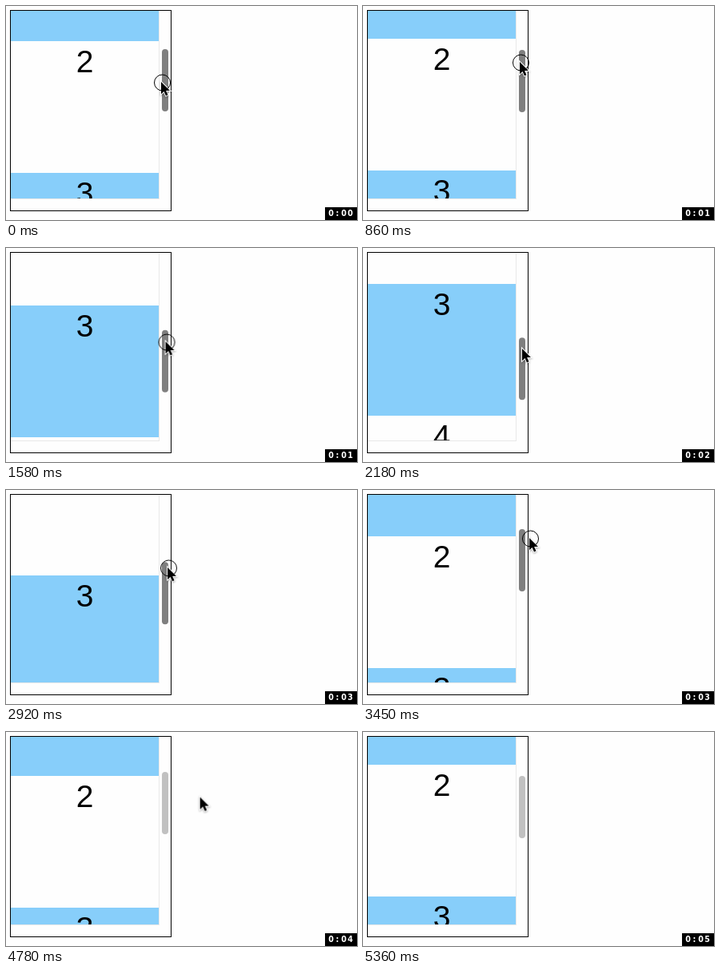
Recreate the animation shown at these times as an HTML page. Size 439 px wide and 268 px high, loop 5.75 s.

```html
<!DOCTYPE html>
<html lang="en">
<head>
<meta charset="utf-8">
<title>Scroll snapping</title>
<style>
  @property --scroll { syntax: '<integer>'; inherits: true; initial-value: 127; }

  html, body { margin: 0; width: 100%; height: 100%; overflow: hidden; background: #fefefe; }
  #stage { display: block; width: 439px; height: 268px; animation: scroll 5750ms linear infinite; }

  .content { transform: translateY(calc(var(--scroll) * -1px)); }
  .content text { font: 39px "Liberation Sans", Arial, sans-serif; text-anchor: middle; }
  .blue { fill: #87cefa; }
  .track { fill: #e8e8e8; }

  .thumb {
    transform: translateY(calc(var(--scroll) * .356px));
    animation: thumb 5750ms step-end infinite;
  }
  .pointer { animation: move 5750ms linear infinite, leave 5750ms step-end infinite; }
  .ring { fill: none; stroke: #000; animation: press 5750ms step-end infinite; }
  .arrow { stroke: #fff; stroke-width: 2; paint-order: stroke; filter: drop-shadow(0 1px 1px #0005); }

  .clock text { font: bold 9.6px "DejaVu Sans", sans-serif; fill: #fff; text-anchor: middle; }
  .seconds { animation: tick 5750ms step-end infinite; }

  @keyframes scroll {
    0%, .52% { --scroll: 127; }
    1.39% { --scroll: 130; }
    14.96% { --scroll: 130; animation-timing-function: ease-in; }
    21.57% { --scroll: 203; }
    24.52% { --scroll: 238; }
    25.04% { --scroll: 240; animation-timing-function: ease-out; }
    32.7% { --scroll: 291; }
    37.91% { --scroll: 291; animation-timing-function: ease-in-out; }
    41.39% { --scroll: 295; }
    48.17% { --scroll: 295; animation-timing-function: ease-in; }
    50.78% { --scroll: 229; animation-timing-function: ease-out; }
    58.09% { --scroll: 125; }
    60% { --scroll: 113; animation-timing-function: ease-out; }
    61.39%, 69.22% { --scroll: 105; }
    73.22% { --scroll: 94; }
    80% { --scroll: 94; animation-timing-function: ease-in-out; }
    85.5%, 100% { --scroll: 130; }
  }
  @keyframes move {
    0% { transform: translate(194px, 95px); }
    7.13% { transform: translate(194px, 95px); animation-timing-function: ease-in-out; }
    12.35% { transform: translate(196px, 70px); }
    14.96% { transform: translate(196px, 70px); animation-timing-function: ease-in; }
    21.57% { transform: translate(200px, 97px); }
    24.52% { transform: translate(200px, 108px); }
    25.04% { transform: translate(200px, 109px); animation-timing-function: ease-out; }
    32.7% { transform: translate(199px, 126px); }
    48.17% { transform: translate(199px, 126px); animation-timing-function: ease-in; }
    50.78% { transform: translate(202px, 97px); animation-timing-function: ease-out; }
    58.09% { transform: translate(207px, 64px); }
    60% { transform: translate(208px, 60px); animation-timing-function: ease-out; }
    61.39%, 69.22% { transform: translate(208px, 58px); }
    73.22% { transform: translate(209px, 54px); }
    80.4% { transform: translate(209px, 54px); animation-timing-function: ease-in-out; }
    89.74% { transform: translate(396px, 207px); }
    90.26% { transform: translate(397px, 208px); animation-timing-function: ease-out; }
    93.2%, 100% { transform: translate(403px, 254px); }
  }
  @keyframes press {
    0%, 14.96%, 48.17% { opacity: 1; }
    .52%, 37.91%, 80%, 100% { opacity: 0; }
  }
  @keyframes leave {
    0% { visibility: visible; }
    93.2%, 100% { visibility: hidden; }
  }
  @keyframes thumb {
    0% { fill: #7f7f7f; }
    80%, 100% { fill: #c1c1c1; }
  }
  @keyframes tick {
    0% { transform: translateY(0); }
    14.96% { transform: translateY(-16px); }
    31.83% { transform: translateY(-32px); }
    49.22% { transform: translateY(-48px); }
    66.61% { transform: translateY(-64px); }
    84%, 100% { transform: translateY(-80px); }
  }
</style>
</head>
<body>
<svg id="stage" viewBox="0 0 439 268">
  <rect x="5.5" y="5.5" width="201" height="251" fill="#fefefe" stroke="#000"/>

  <svg x="6" y="6" width="185" height="235">
    <g class="content">
      <rect class="blue" width="185" height="165"/>
      <rect class="blue" y="330" width="185" height="165"/>
      <text x="92.5" y="39">1</text>
      <text x="92.5" y="204">2</text>
      <text x="92.5" y="369">3</text>
      <text x="92.5" y="534">4</text>
    </g>
  </svg>

  <rect class="track" x="191" y="6" width="1" height="236"/>
  <rect class="track" x="6" y="241" width="185" height="1"/>
  <rect class="thumb" x="195" y="8.7" width="8" height="78" rx="4"/>

  <g class="pointer">
    <path class="arrow" d="M0 0V15.2L3.6 11.9L6 17.4L8.5 16.3L6.1 11H11Z"/>
    <circle class="ring" cx="1.5" cy="1" r="10"/>
  </g>

  <g class="clock">
    <rect x="399" y="252" width="40" height="16"/>
    <text x="406.5" y="263">0</text>
    <text x="414.5" y="263">:</text>
    <text x="422.5" y="263">0</text>
    <svg x="426" y="252" width="9" height="16">
      <g class="seconds">
        <text x="4.5" y="11">0</text>
        <text x="4.5" y="27">1</text>
        <text x="4.5" y="43">2</text>
        <text x="4.5" y="59">3</text>
        <text x="4.5" y="75">4</text>
        <text x="4.5" y="91">5</text>
      </g>
    </svg>
  </g>
</svg>
</body>
</html>
```
